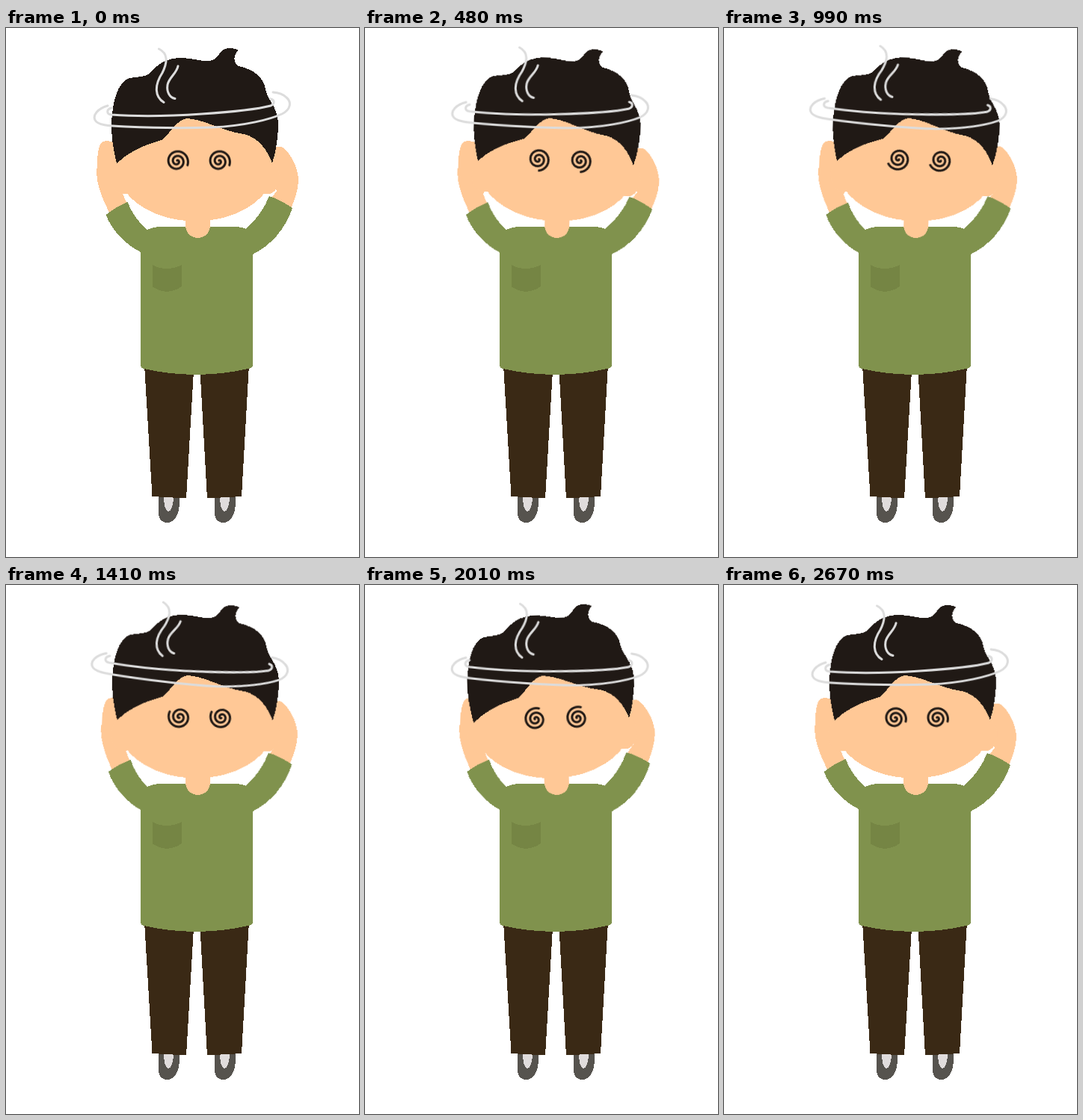
An HTML page that plays this animation: 472x708 px, repeating every 2700 ms.

```html
<!DOCTYPE html>
<html lang="en">
<head>
<meta charset="utf-8">
<title>Dizzy</title>
<style>
  html, body { margin: 0; width: 100%; height: 100%; overflow: hidden; background: #fff; }
  svg { display: block; width: 100vw; height: 100vh; shape-rendering: crispEdges; }

  .skin { fill: #ffc896; }
  .shirt { fill: #80924d; }
  .hair { fill: #201915; }
  .line { fill: none; stroke-width: 3; stroke-linecap: round; stroke-linejoin: round; shape-rendering: auto; }
  .swirl { stroke: #dcdcdc; }
  .eye { stroke: #201915; }

  .head, .arm-l, .arm-r, .hand-r, .swirl, .eye { animation: 2.7s linear infinite; }
  .head { animation-name: sway; transform-origin: 256px 270px; }
  .arm-l { animation-name: arm-l; transform-origin: 140px 325px; }
  .arm-r { animation-name: arm-r; transform-origin: 325px 285px; }
  .hand-r { animation-name: hand-r; }
  .swirl { animation-name: tilt; transform-origin: 253px 81px; }
  .eye { animation-name: spin; transform-origin: 0 0; }

  @keyframes sway {
    0%, 100% { transform: rotate(0deg); }
    27% { transform: rotate(2.8deg); }
    77% { transform: rotate(-2deg); }
  }
  @keyframes arm-l {
    0% { transform: rotate(0deg); animation-timing-function: cubic-bezier(.4, .53, .65, 1); }
    58% { transform: rotate(2.6deg); animation-timing-function: cubic-bezier(.47, 0, .745, .715); }
    100% { transform: rotate(0deg); }
  }
  @keyframes arm-r {
    0%, 100% { transform: rotate(0deg); }
    21.9% { transform: rotate(2deg); }
    71% { transform: rotate(-2.6deg); }
  }
  @keyframes hand-r {
    0%, 100% { transform: translateY(0); }
    21.9% { transform: translateY(1px); }
    67% { transform: translateY(-5px); }
  }
  @keyframes tilt {
    0%, 100% { transform: rotate(0deg); }
    50% { transform: rotate(6.4deg); }
  }
  @keyframes spin {
    to { transform: rotate(360deg); }
  }
</style>
</head>
<body>
<svg viewBox="0 0 472 708">
  <defs>
    <g id="shoe">
      <path fill="#56534e" d="M204 626H232V637C231 651 226 662 215 662C208 662 204 657 204 649Z"/>
      <path fill="#e0dcdc" d="M211 626H224C224 638 221 647 217 647C213 647 211 638 211 626Z"/>
    </g>
  </defs>

  <use href="#shoe"/>
  <use href="#shoe" x="75"/>
  <path fill="#3a2915" d="M185 450H251.500L241 629.500L195.500 627ZM259 450H325L315 627L269 629.500Z"/>

  <g class="arm-l">
    <path class="skin" d="M126 155C129 150 137 150 148 154L165 205L156 222L163 238L142 254C126 225 120 205 121.500 188C122 172 123 162 126 155Z"/>
    <path class="shirt" d="M133.500 250Q146 240 162.500 233Q171 255 189 270L202 302L182 301Q147 283 133.500 250Z"/>
  </g>
  <g class="arm-r">
    <path class="skin hand-r" d="M345 160L366 158.500C375 159 391 184 391 203C391 216 386 232 378 247L348 237L362 218L350 205Z"/>
    <path class="shirt" d="M352 225Q367 230 383 241Q368 284 328 304L312 300L321 269Q342 250 352 225Z"/>
  </g>

  <path class="shirt" d="M180 299V280Q187 266 208 266H304Q318 266 323 270L330 280V451Q330 454.500 326 455.500Q255 472 184 456Q180 455 180 451Z"/>
  <path fill="#758544" d="M195.500 317Q215 327 235 317V346Q215 359.500 195.500 346Z"/>

  <g class="head">
    <path class="skin" d="M240 250H273V264.500A16.500 16.500 0 0 1 240 264.500Z"/>
    <ellipse class="skin" cx="157" cy="200" rx="17" ry="22.500"/>
    <ellipse class="skin" cx="349" cy="200" rx="17" ry="22.500"/>
    <ellipse class="skin" cx="253.500" cy="185.500" rx="105.500" ry="73"/>
    <path class="hair" d="M148 181C143 162 141 145 141 128C142 100 149 72 165 67C178 65 186 66 193 60C203 49 212 40 236 40C256 41 266 47 276 43C286 39 285 28 298 27C304 26.500 308 28 311 30C303 36 304 47 311 51C330 55 344 65 347 82C350 97 362 104 364 126C364 147 361 165 356 181C350 164 337 146 318 142C288 138 266 122 241 121C224 125 216 149 205 151C182 157 163 167 148 181Z"/>
    <g transform="translate(230 177.500)"><path class="line eye"/></g>
    <g transform="translate(286 177.500)"><path class="line eye"/></g>
  </g>

  <g class="line swirl">
    <path d="M136 104C122 108 116 117 119 123C122 130 136 131 160 132C205 134 245 134 275 133C320 131 354 122 369 115C381 109 382 99 375 93C370 88 364 86.500 357 86"/>
    <path d="M141 107C134 109 134 115 141 116C175 118.500 225 117.500 262 115C300 112.500 335 109 354 104C360 101 359 96 354 95"/>
    <path d="M204.500 28C217 34 216 46 209 60C198 77 199 92 211 99.500"/>
    <path d="M230 51C228 61 218 66 216 76C214.500 86 219 93 226 94.500"/>
  </g>
</svg>
<script>
  // Archimedean spiral wound inwards, its centre slightly off the pivot
  const turns = 2.3, steps = 90, points = [];
  for (let i = 0; i <= steps; i++) {
    const k = i / steps;
    const a = 0.36 - k * turns * 2 * Math.PI;
    const r = 15 - 14 * k;
    points.push((r * Math.cos(a) - 1.3).toFixed(2) + " " + (r * Math.sin(a) + 0.8).toFixed(2));
  }
  for (const eye of document.querySelectorAll(".eye")) eye.setAttribute("d", "M" + points.join("L"));
</script>
</body>
</html>
```
